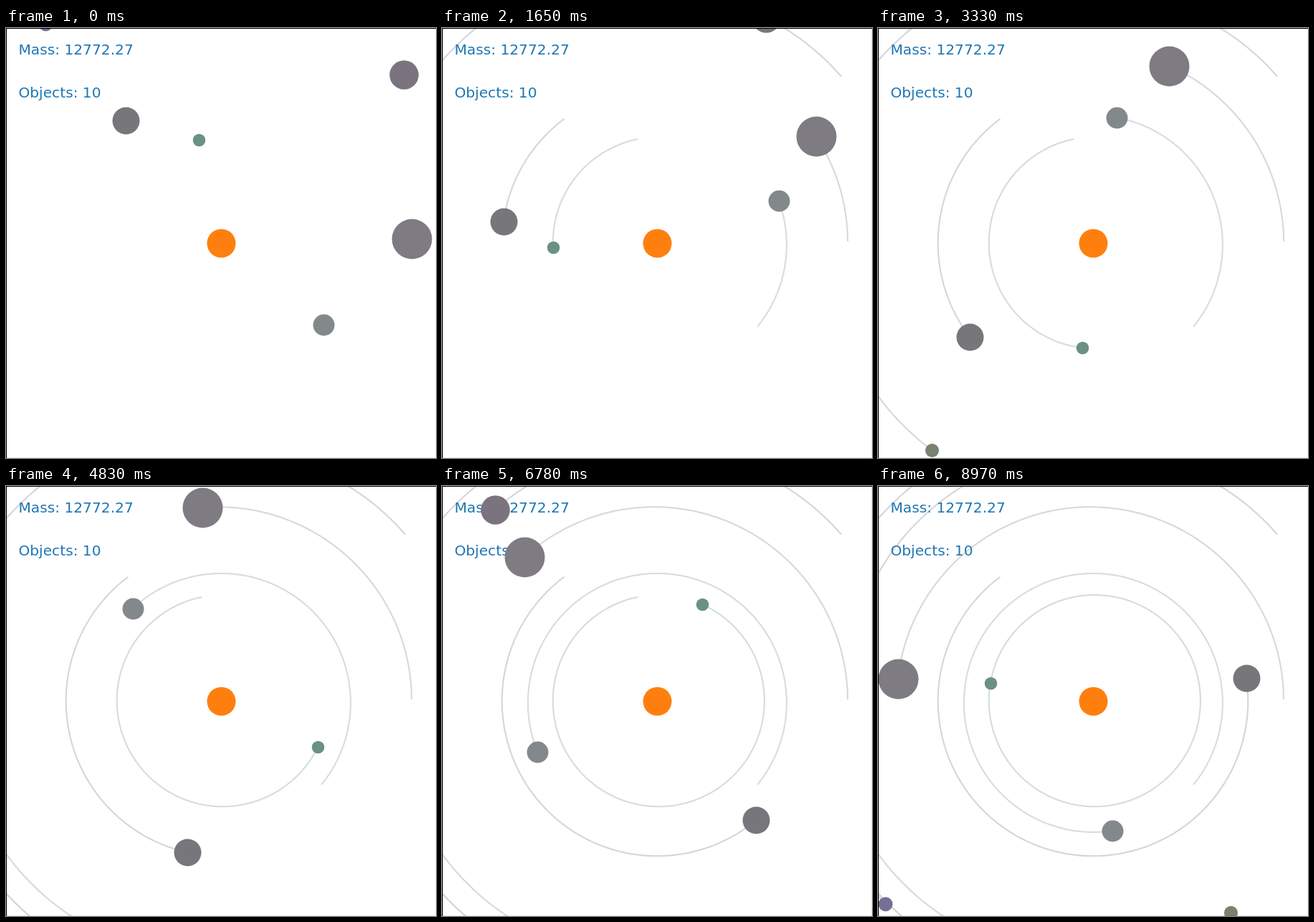
Write an HTML page that moves like this. It is 600 by 600 pixels and loops after 9000 ms.

```html
<!DOCTYPE html>
<html lang="en">
<head>
<meta charset="utf-8">
<title>Orbits</title>
<style>
  html, body { margin: 0; width: 100%; height: 100%; overflow: hidden; background: #fff; }
  svg { display: block; width: 600px; height: 600px; }
  text { font: 20.2px "DejaVu Sans", sans-serif; fill: #1f77b4; white-space: pre; }
  path { fill: none; stroke-width: 2.08; stroke-opacity: .3; stroke-linecap: square; stroke-linejoin: round; }
</style>
</head>
<body>
<svg id="stage" viewBox="0 0 600 600">
  <text x="17.4" y="37">Mass: 12772.27</text>
  <text x="17.4" y="97">Objects: 10</text>
  <g id="trails"></g>
  <g id="bodies"><circle cx="300.5" cy="300.5" r="20" fill="#ff7f0e"/></g>
  <rect x=".5" y=".5" width="600" height="600" fill="none" stroke="#000" stroke-width="1.11"/>
</svg>
<script>
const STEP = 30, STEPS = 300, SUN = 300, RAD = Math.PI / 180;

// size: disc radius; a: semi-major axis; e: eccentricity; w: periapsis angle;
// lon: mean longitude at the start; n: degrees per second
const planets = [
  { size: 8.8,  color: '#6a9183', a: 147.6, e: .016,  w: 188, lon: 104.05, n: 47.565 },
  { size: 15,   color: '#83898b', a: 180.5, e: .0139, w: 99,  lon: -37.42, n: 35.222 },
  { size: 19,   color: '#77767b', a: 216.3, e: 0,     w: 0,   lon: 127.87, n: 26.826 },
  { size: 28,   color: '#7f7b82', a: 270,   e: .0148, w: -11, lon: .93,    n: 19.253 },
  { size: 20.3, color: '#7b747f', a: 343.3, e: .0218, w: -75, lon: 40.45,  n: 13.414 },
  { size: 9.5,  color: '#7a8270', a: 356,   e: .0365, w: 15,  lon: 191.96, n: 12.825 },
  { size: 10,   color: '#766f98', a: 398,   e: .0226, w: 80.5, lon: 126.75, n: 10.7 },
  { size: 8.5,  color: '#82606f', a: 394,   e: .0254, w: 10,  lon: 179.67, n: 10.91 }
];

function position({ a, e, w, lon, n }, seconds) {
  const m = (lon + n * seconds - w) * RAD;
  const v = m + 2 * e * Math.sin(m) + 1.25 * e * e * Math.sin(2 * m);
  const r = a * (1 - e * e) / (1 + e * Math.cos(v));
  const angle = v + w * RAD;
  return [SUN + r * Math.cos(angle), SUN - r * Math.sin(angle)];
}

function add(parent, tag, attrs) {
  const node = document.createElementNS('http://www.w3.org/2000/svg', tag);
  for (const key in attrs) node.setAttribute(key, attrs[key]);
  return document.getElementById(parent).appendChild(node);
}

for (const p of planets) {
  p.trail = add('trails', 'path', { stroke: p.color });
  p.disc = add('bodies', 'circle', { r: p.size, fill: p.color });
  // The trail begins one step before the first picture.
  p.points = Array.from({ length: STEPS + 1 }, (_, i) => position(p, (i - 1) * STEP / 1000));
  p.coords = p.points.map(([x, y]) => x.toFixed(2) + ' ' + y.toFixed(2));
}

function draw(step) {
  for (const p of planets) {
    const [x, y] = p.points[step + 1];
    p.trail.setAttribute('d', 'M' + p.coords.slice(0, step + 2).join('L'));
    // Discs sit on whole pixels.
    p.disc.setAttribute('cx', Math.round(x) + .5);
    p.disc.setAttribute('cy', Math.round(y) + .5);
  }
}

const start = performance.now();
let shown = -1;

function tick() {
  const step = Math.floor((performance.now() - start) / STEP) % STEPS;
  if (step !== shown) draw(shown = step);
  requestAnimationFrame(tick);
}
tick();
</script>
</body>
</html>
```
